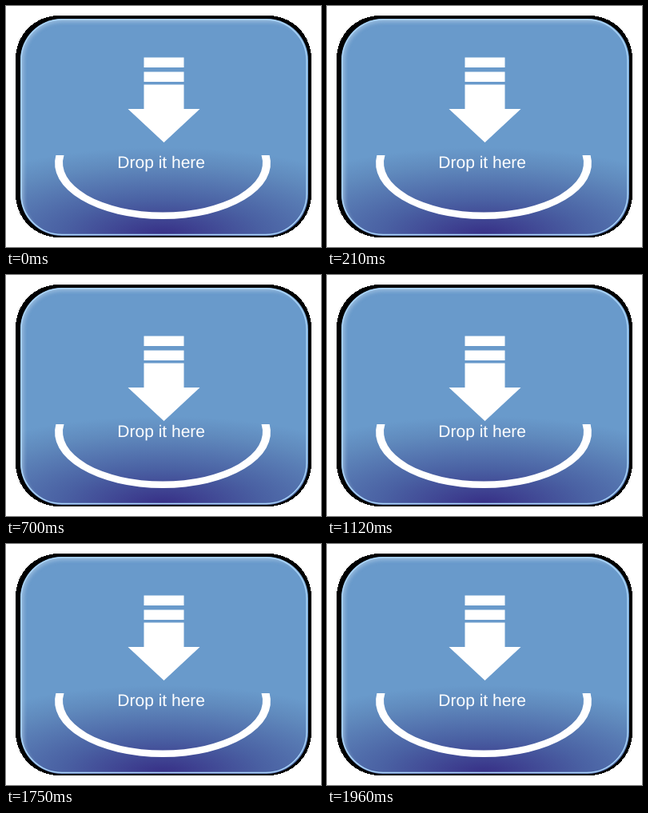
Animation of 394 by 302 pixels, one loop 2.1 s. Source, as an HTML page:

```html
<!DOCTYPE html>
<html lang="en">
<head>
<meta charset="utf-8">
<title>Drop it here</title>
<style>
  html, body { margin: 0; width: 100%; height: 100%; overflow: hidden; background: #fff; }
  svg { display: block; width: 394px; height: 302px; }
  text { font: 21px "Liberation Sans", Arial, sans-serif; text-rendering: geometricPrecision; }
  .arrow { animation: drop 2100ms step-end infinite; }
  @keyframes drop {
    0%, 83.3333% { transform: translateY(0); }
    16.6667%, 66.6667% { transform: translateY(6px); }
    33.3333% { transform: translateY(12px); }
    100% { transform: translateY(0); }
  }
</style>
</head>
<body>
<svg viewBox="0 0 394 302">
  <defs>
    <radialGradient id="dusk" gradientUnits="userSpaceOnUse" r="1"
        gradientTransform="translate(196 287) scale(320 110)" cx="0" cy="0">
      <stop offset="0" stop-color="#372f86"/>
      <stop offset=".4" stop-color="#4a61a3"/>
      <stop offset=".8" stop-color="#608abd"/>
      <stop offset="1" stop-color="#699acb"/>
    </radialGradient>
    <filter id="soft" x="-10%" y="-10%" width="120%" height="120%">
      <feGaussianBlur stdDeviation="2.5"/>
    </filter>
    <clipPath id="inside"><rect x="18" y="16" width="360" height="272" rx="52"/></clipPath>
  </defs>

  <rect x="12" y="12" width="370" height="278" rx="54" shape-rendering="crispEdges"/>
  <rect x="18" y="16" width="360" height="272" rx="52" fill="url(#dusk)"/>
  <g clip-path="url(#inside)" fill="none">
    <rect x="18" y="16" width="366" height="278" rx="52" stroke="#b4cfe9" stroke-width="8" opacity=".65" filter="url(#soft)"/>
    <rect x="19" y="17" width="357" height="269.5" rx="51" stroke="#a9d4f8" stroke-width="1.5"/>
  </g>

  <g fill="#fff">
    <path d="M62.400 187A135 70 0 1 0 329.600 187H319.500A125 62 0 1 1 72.500 187Z"/>
    <text x="139.300" y="202.500">Drop it here</text>
    <path class="arrow" d="M172.500 64.500h50v12.500h-50zM172.500 82.500h50v12.500h-50zM172.500 98.500h50v30.500h20L197.500 171 152.500 129h20z"/>
  </g>
</svg>
</body>
</html>
```
